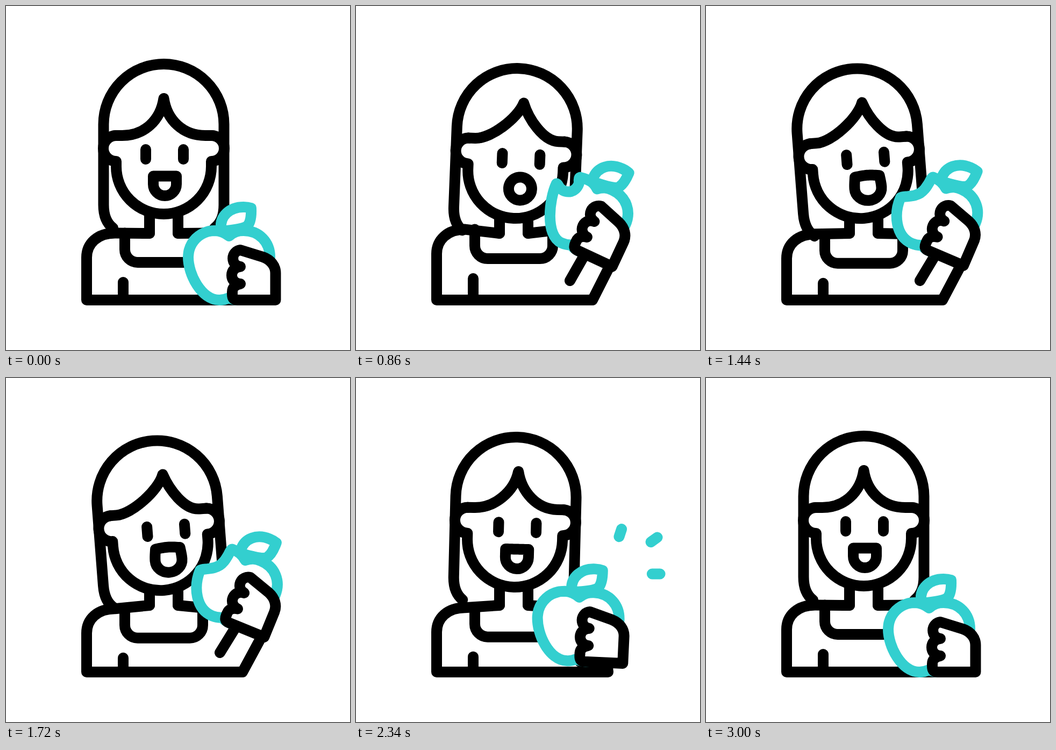
Animation, 640 px wide and 640 px high, one loop 3.1 s. Source, as an HTML page:

```html
<!DOCTYPE html>
<html lang="en">
<head>
<meta charset="utf-8">
<title>Woman eating an apple</title>
<style>
  html, body { margin: 0; width: 100%; height: 100%; overflow: hidden; background: #fff; }
  svg { display: block; width: 100vw; height: 100vh; }
  path { fill: none; stroke: #000; stroke-width: 20; stroke-linecap: round; stroke-linejoin: round; }
  .solid { fill: #fff; }
  .teal, .teal path { stroke: #33cfcf; }
</style>
</head>
<body>
<svg viewBox="0 0 640 640">
  <path id="torso"/>
  <path id="neckline"/>
  <path d="M267 385V423M320 385V423"/>
  <path id="sleeve"/>
  <path id="arm"/>
  <g id="head">
    <path d="M199 413C187 404 181.5 388 181.5 370V220A112 112 0 0 1 405.5 220V370C405.5 388 400 404 388 413"/>
    <path class="solid" d="M205 241A24 24 0 0 0 205 289V298.5A88.5 88.5 0 0 0 382 298.5V289A24 24 0 0 0 382 241"/>
    <path id="fringe"/>
    <g id="features">
      <path d="M260 267V285M330 267V285"/>
      <path id="mouth"/>
    </g>
  </g>
  <g id="hand">
    <g class="teal">
      <path class="solid" id="apple"/>
      <path class="solid" d="M400 413C398 391 416 374 442 374Q450 374 456 376Q457 399 450 408C444 414 430 416 403 419Z"/>
    </g>
    <path class="solid" d="M430 547C423 547 421 543 421 536V532Q421 520 436 517A16 16 0 0 1 436 485A15.6 15.6 0 0 1 436 454L478 467C492 472 501.500 483 501.500 497V547Z"/>
  </g>
  <path class="teal" id="sparks"/>
</svg>
<script>
const LOOP = 3100;
const DEG = Math.PI / 180;
const el = id => document.getElementById(id);
const draw = (id, d) => el(id).setAttribute('d', d);
const move = (id, t) => el(id).setAttribute('transform', t);
const mix = (a, b, k) => a + (b - a) * k;
const clamp = k => Math.min(1, Math.max(0, k));
const part = (t, from, to) => clamp((t - from) / (to - from));
const ease = (t, from, to) => {
  const k = part(t, from, to);
  return k * k * (3 - 2 * k);
};

// Points along an arc whose radius may widen at both ends.
function arc(cx, cy, r, from, to, flare) {
  return Array.from({ length: 7 }, (_, i) => {
    const u = i / 6, a = mix(from, to, u) * DEG, s = r * (1 + flare * (2 * u - 1) ** 4);
    return [cx + s * Math.cos(a), cy + s * Math.sin(a)];
  });
}

// Upper left edge of the apple: whole, bitten once, bitten twice.
const EDGES = [
  arc(388, 467, 49, 180, 270, 0),
  arc(361, 438, 19, 145, -45, 0.2),
  arc(349, 437, 31, 97, -28, 0.3)
];

// Smooth curve through all points but the first and last, which only steer it.
function through(pts) {
  let d = '';
  for (let i = 1; i < pts.length - 2; i++) {
    const [a, b, c, e] = pts.slice(i - 1, i + 3);
    d += `C${b[0] + (c[0] - a[0]) / 6} ${b[1] + (c[1] - a[1]) / 6} ` +
         `${c[0] - (e[0] - b[0]) / 6} ${c[1] - (e[1] - b[1]) / 6} ${c[0]} ${c[1]}`;
  }
  return d;
}

function applePath(bite) {
  const n = Math.min(1, Math.floor(bite));
  const edge = EDGES[n].map((p, i) => p.map((v, j) => mix(v, EDGES[n + 1][i][j], bite - n)));
  const [x, y] = edge[0];
  return 'M415 428C424 420 432 418 442 418C472 418 491 440 491 467C491 500 468 547 433 547' +
    `Q424 547 415 543Q406 547 397 547C364 547 ${x} ${y + 33} ${x} ${y}` +
    through([[x, y + 14], ...edge, [398, 418]]) + 'C397 418 405 420 415 428Z';
}

// Bowl below, and a top that goes from square to round.
function mouthPath(round, r, up, down) {
  const x = 295.5, y = 331.5, pts = [];
  for (let i = 0; i <= 32; i++) {
    const a = Math.PI * (1 + i / 32), c = Math.cos(a), s = Math.sin(a);
    const k = mix(1 / Math.max(Math.abs(c), Math.abs(s)), 1, round);
    pts.push(`${x + r * c * k} ${y + up * s * k}`);
  }
  return `M${pts.join('L')}A${r} ${down} 0 0 1 ${x - r} ${y}Z`;
}

function fringePath(look, nod) {
  const peak = 293.5 + look * 1.3, bend = 41 * (1 - 0.3 * nod), lean = 6 + 4 * nod;
  return `M203 241H216C${216 + bend} 241 ${peak - lean} ${172 + bend} ${peak} 172` +
    `C${peak + lean} ${172 + bend} ${371 - bend} 241 371 241H384`;
}

// Three rays spread from one centre.
function sparkPath(t) {
  const head = 1 - (1 - part(t, 2020, 2460)) ** 2, tail = ease(t, 2160, 2540);
  if (head - tail < 0.01) return '';
  return [69, 86, 58].map((r, i) => {
    const a = -36 * i * DEG;
    const spot = k => `${467 + (r + 32 * k) * Math.cos(a)} ${364.5 + (r + 32 * k) * Math.sin(a)}`;
    return `M${spot(tail)}L${spot(head)}`;
  }).join('');
}

// Raised is 1, resting is 0; the arm drops past its rest and settles.
const liftAt = t => ease(t, 80, 680) - 1.33 * ease(t, 1960, 2660) + 0.33 * ease(t, 2660, 3000);

function render(t) {
  const drift = ease(t, 860, 1900) - ease(t, 2000, 2500);
  const nod = ease(t, 80, 560) - ease(t, 2000, 2500);
  const wide = ease(t, 80, 380) - ease(t, 2000, 2340);
  const grin = ease(t, 920, 1300) - ease(t, 2000, 2340);
  const tilt = 4.6 * ease(t, 80, 480) - 9 * ease(t, 560, 1460) + 6 * ease(t, 1870, 2390) - 1.6 * ease(t, 2400, 3000);
  const breath = -7 * ease(t, 0, 400) + 16 * ease(t, 800, 2000) - 9 * ease(t, 2000, 2700);
  const bite = ease(t, 540, 640) + ease(t, 1080, 1200) - 2 * ease(t, 2060, 2200);

  // The wrist turns slightly ahead of the lift.
  const lift = liftAt(t);
  const turn = 25 * liftAt(t + 40) - 3 * drift;
  const hx = mix(502, 477, lift) + 4 * drift, hy = mix(547, 485, lift) - 3 * drift;
  const cuff = d => `${hx + d * Math.cos(turn * DEG)} ${hy + d * Math.sin(turn * DEG)}`;
  const fold = clamp(lift * 1.7), reach = clamp(lift) ** 3;

  const top = 422.5 + breath, low = 477 + breath;
  draw('torso', `M267 423L203 ${top}C170 ${top} 150 ${442 + breath} 150 ${468 + breath}V547` +
    `H${mix(490, 440, fold)}L${cuff(mix(-30, -5, reach))}M320 423L384 ${top}`);
  draw('neckline', `M221 ${top}V${low - 24}A24 24 0 0 0 245 ${low}H342A24 24 0 0 0 366 ${low - 24}V${top}`);
  draw('sleeve', `M218 ${514 + breath}V547`);
  draw('arm', `M${mix(430, 398, fold)} ${mix(540, 511, fold)}L${cuff(mix(-76, -56, reach))}`);

  const look = nod * 8 + 3 * drift;
  move('head', `translate(0 ${8 * nod}) rotate(${tilt} 293.5 380)`);
  move('features', `translate(${look} 0)`);
  draw('fringe', fringePath(look, nod));
  draw('mouth', mouthPath(wide - 0.7 * grin, 21.5 + 3.5 * grin, 15 + 6.5 * wide + 2.5 * grin, 21.5 + 1.5 * grin));

  move('hand', `translate(${hx} ${hy}) rotate(${turn}) translate(-502 -547)`);
  draw('apple', applePath(bite));
  draw('sparks', sparkPath(t));
}

function tick() {
  render(performance.now() % LOOP);
  requestAnimationFrame(tick);
}
tick();
</script>
</body>
</html>
```
